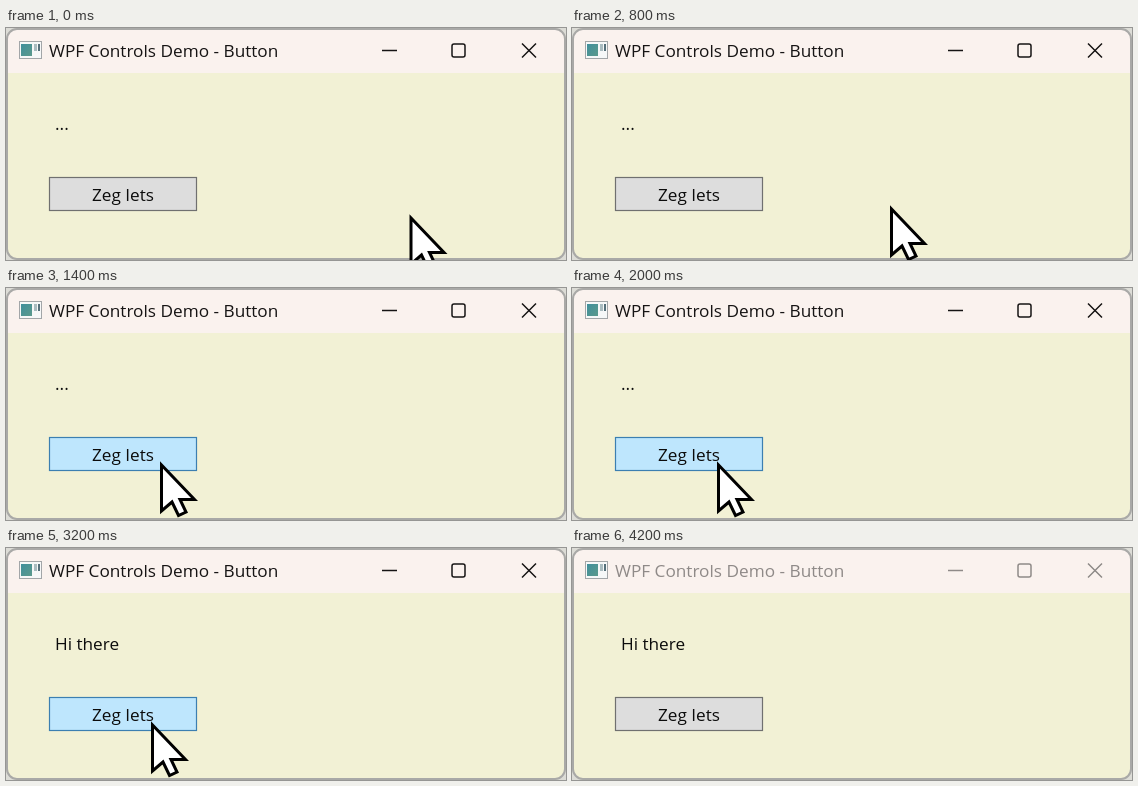
Write an HTML page that moves like this. It is 560 px wide and 232 px high and loops after 4.4 s.

```html
<!DOCTYPE html>
<html lang="nl">
<head>
<meta charset="utf-8">
<title>Button demo</title>
<style>
  html, body { margin: 0; width: 100%; height: 100%; overflow: hidden; background: #dcdcd6; }
  svg { display: block; }
  text { font: 17.2px "Open Sans", "Noto Sans", sans-serif; fill: #0c0c0c; }
  #chrome { --ink: #161414; }
  #chrome.inactive { --ink: #8f8a88; }
  #chrome text { fill: var(--ink); }
  #chrome path, #chrome rect { fill: none; stroke: var(--ink); stroke-width: 1.5; }
  #button rect { fill: #dddddd; stroke: #707070; }
  #button.hover rect { fill: #bee6fd; stroke: #3c7fb1; }
  #button.pressed rect { fill: #c4e5f6; stroke: #2c628b; }
</style>
</head>
<body>
<svg width="560" height="232" viewBox="0 0 560 232">
  <defs>
    <linearGradient id="teal" x2="1" y2="1">
      <stop offset="0" stop-color="#3f8f9c"/>
      <stop offset="1" stop-color="#5b9a8c"/>
    </linearGradient>
    <clipPath id="frame"><rect x="1" y="1" width="558" height="230" rx="10"/></clipPath>
  </defs>

  <g clip-path="url(#frame)">
    <rect width="560" height="232" fill="#f2f1d5"/>
    <rect width="560" height="45" fill="#faf2ee"/>
  </g>
  <rect x="1" y="1" width="558" height="230" rx="10" fill="none" stroke="#a9a9a7" stroke-width="2"/>

  <g id="icon">
    <rect x="13.5" y="13.5" width="22" height="17" fill="#f6f8f8" stroke="#a2a6a8"/>
    <rect x="15" y="16" width="11" height="12" fill="url(#teal)"/>
    <rect x="28" y="16" width="3" height="7" fill="#a9bcc0"/>
    <rect x="32" y="16" width="2" height="7" fill="#55707a"/>
  </g>

  <g id="chrome">
    <text x="43" y="29">WPF Controls Demo - Button</text>
    <path d="M376 22.5h15M516 15.5l14 14M530 15.5l-14 14"/>
    <rect x="446" y="16" width="13" height="13" rx="2"/>
  </g>

  <text id="label" x="49" y="102">...</text>

  <g id="button">
    <rect x="43.5" y="149.5" width="147" height="33" stroke-width="1.2"/>
    <text x="117" y="173" text-anchor="middle">Zeg Iets</text>
  </g>

  <path id="cursor" d="M0 0V46L10.5 37L17 50.5L24.5 47L18.5 34.5H33Z"
        fill="#fff" stroke="#000" stroke-width="3" stroke-miterlimit="6"/>
</svg>
<script>
  const LOOP = 4400;
  const PRESS = 2200, RELEASE = 2400, LEAVE = 3400, BLUR = 4200;

  // Cursor stops: time, x, y
  const stops = [
    [0, 405, 190], [600, 390, 186], [800, 319.5, 181], [1000, 247, 182],
    [1200, 223.5, 184], [1400, 155.5, 177], [1600, 144, 174], [1800, 146.5, 177]
  ];
  const HOVER = 1400;
  const $ = id => document.getElementById(id);
  const [chrome, label, button, cursor] = ["chrome", "label", "button", "cursor"].map($);

  function buttonState(t) {
    if (t < HOVER || t >= LEAVE) return "";
    return t >= PRESS && t < RELEASE ? "pressed" : "hover";
  }

  function draw(t) {
    const [, x, y] = stops.filter(s => s[0] <= t).pop();
    cursor.setAttribute("transform", `translate(${x} ${y})`);
    cursor.setAttribute("visibility", t < LEAVE ? "visible" : "hidden");
    button.setAttribute("class", buttonState(t));
    label.textContent = t < RELEASE ? "..." : "Hi there";
    chrome.setAttribute("class", t < BLUR ? "" : "inactive");
  }

  const start = performance.now();
  function tick() {
    draw((performance.now() - start) % LOOP);
    requestAnimationFrame(tick);
  }
  draw(0);
  requestAnimationFrame(tick);
</script>
</body>
</html>
```
